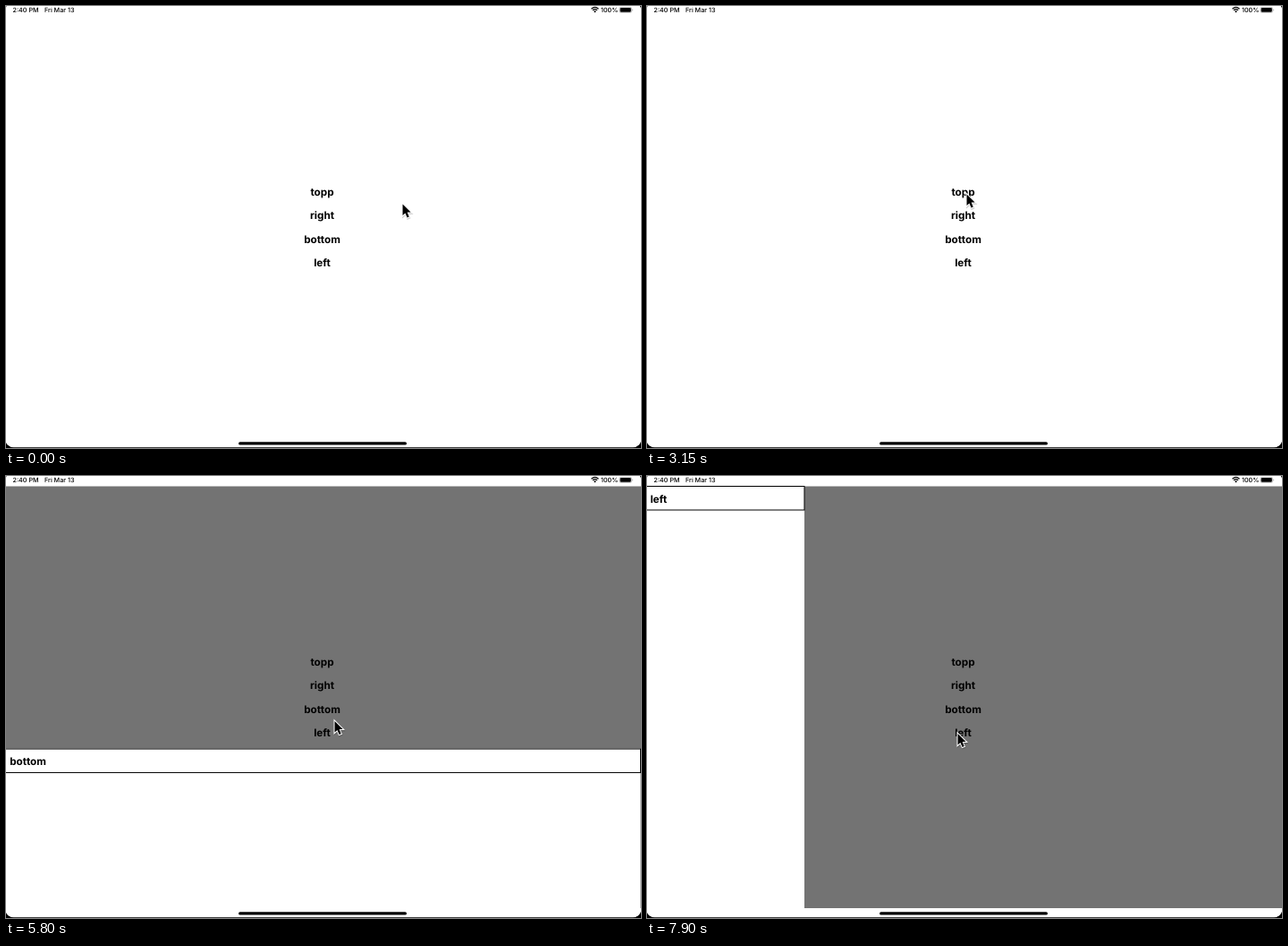
Animation, 710 px wide and 494 px high, one loop 8 s. Source, as an HTML page:

```html
<!DOCTYPE html>
<html lang="en">
<head>
<meta charset="utf-8">
<title>Drawers</title>
<style>
  html, body { margin: 0; width: 100%; height: 100%; overflow: hidden; background: #000; }
  svg { display: block; width: 710px; height: 494px; }
  text { font: 700 11.7px Inter, "Liberation Sans", sans-serif; text-rendering: geometricPrecision; }
  #menu { text-anchor: middle; }
  .status text { font-size: 7.2px; font-weight: 500; }
  .sheet { fill: #fff; }
  .head { fill: #fff; stroke: #000; }
</style>
</head>
<body>
<svg viewBox="0 0 710 494">
  <defs>
    <clipPath id="glass"><rect x="-1" y="-4" width="711.5" height="497.2" rx="9.5"/></clipPath>
    <path id="arrow" d="M0 0V12.6L2.9 9.9L5.1 15L7.2 14.1L5.1 9.1H9.1Z"/>
  </defs>
  <g clip-path="url(#glass)">
    <rect width="710" height="494" fill="#fff"/>
    <g id="menu"></g>
    <rect id="shade" y="11.5" width="710" height="471.5" fill-opacity=".55"/>
    <g id="panels"></g>
    <g class="status">
      <text x="7.5" y="6.8">2:40 PM</text>
      <text x="43" y="6.8">Fri Mar 13</text>
      <text x="665" y="6.8">100%</text>
      <path d="M654.5 3.2Q658.5 -.4 662.5 3.2M656 4.8Q658.5 2.6 661 4.8" fill="none" stroke="#000" stroke-width="1.2"/>
      <path d="M657 5.8Q658.5 4.6 660 5.8L658.5 7.4Z"/>
      <rect x="685.8" y="1.3" width="13.8" height="6.2" rx="1.8" fill="none" stroke="#aaa" stroke-width=".6"/>
      <rect x="686.6" y="2" width="12.2" height="4.8" rx="1.1"/>
      <rect x="700.3" y="3.4" width=".8" height="2" rx=".4" fill="#aaa"/>
    </g>
    <rect x="260" y="487.2" width="188" height="3.4" rx="1.7"/>
  </g>
  <g id="cursor">
    <use href="#arrow" x=".5" y="1.2" opacity=".2" stroke="#000" stroke-width="2"/>
    <use href="#arrow" stroke="#fff" stroke-width="2" paint-order="stroke"/>
  </g>
</svg>
<script>
const LOOP = 8000, STEP = 50, GLIDE = 200, CLOSE_LAG = 22, CLOSE_TIME = 650;
const SIZE = 179.5, SHIFT = 190, WIDE = 712.5, TALL = 472;
const $ = id => document.getElementById(id);

const panels = [
  { side: 'right', open: 700, close: 1900 },
  { side: 'topp', open: 3500, close: 4500 },
  { side: 'bottom', open: 5550, close: 6200 },
  { side: 'left', open: 7650, close: LOOP }
];

// arrival time, x, y
const stops = [
  [0, 443.5, 221.5], [100, 397.5, 222], [1400, 358.5, 236], [2400, 356.5, 217.5],
  [3150, 357.5, 210.5], [4050, 364.5, 260], [4800, 373.5, 271], [5350, 361, 262],
  [5800, 367.5, 274], [7100, 342, 288], [7400, 347.5, 288]
];

function addGroup(parent, markup) {
  const g = document.createElementNS('http://www.w3.org/2000/svg', 'g');
  g.innerHTML = markup;
  return parent.appendChild(g);
}

['topp', 'right', 'bottom', 'left'].forEach((word, i) =>
  addGroup($('menu'), `<text x="353.5" y="${212 + 26.35 * i}">${word}</text>`));

for (const p of panels) {
  const across = p.side === 'left' || p.side === 'right';
  const away = p.side === 'left' || p.side === 'topp' ? -SHIFT : SHIFT;
  const [w, h] = across ? [SIZE, TALL] : [WIDE, SIZE];
  p.x = p.side === 'right' ? 530 : -3;
  p.y = p.side === 'bottom' ? 304 : 11;
  p.dx = across ? away : 0;
  p.dy = across ? 0 : away;
  p.el = addGroup($('panels'),
    `<rect class="sheet" width="${w}" height="${h}"/>` +
    `<rect class="head" x=".5" y=".5" width="${w - 0.5}" height="26.5"/>` +
    `<text x="7.2" y="18.8">${p.side}</text>`);
}

function spring(ms) {
  if (ms <= 0) return 0;
  const w = 19, z = 0.85, t = ms / 1000;
  const k = Math.sqrt(1 - z * z), a = w * k * t;
  return 1 - Math.exp(-z * w * t) * (Math.cos(a) + z / k * Math.sin(a));
}

function cursorAt(t) {
  const i = stops.findIndex(s => s[0] > t);
  if (i < 0) return stops.at(-1).slice(1);
  const [t0, x0, y0] = stops[i - 1], [t1, x1, y1] = stops[i];
  const start = Math.max(t0, t1 - GLIDE);
  const u = Math.max(0, (t - start) / (t1 - start));
  return [x0 + (x1 - x0) * u, y0 + (y1 - y0) * u];
}

const move = (el, x, y) => el.setAttribute('transform', `translate(${x.toFixed(2)} ${y.toFixed(2)})`);
const show = (el, on) => { el.style.display = on ? '' : 'none'; };

function draw(now) {
  const t = Math.floor((now + 4) / STEP) * STEP % LOOP;
  let shaded = false;
  for (const p of panels) {
    const on = t >= p.open && t < p.close + CLOSE_TIME;
    const shut = t < p.close ? 1 - spring(t - p.open) : spring(t - p.close - CLOSE_LAG);
    show(p.el, on);
    move(p.el, p.x + p.dx * shut, p.y + p.dy * shut);
    shaded = shaded || on;
  }
  show($('shade'), shaded);
  move($('cursor'), ...cursorAt(t));
}

function tick(now) {
  draw(now);
  requestAnimationFrame(tick);
}
draw(0);
requestAnimationFrame(tick);
</script>
</body>
</html>
```
